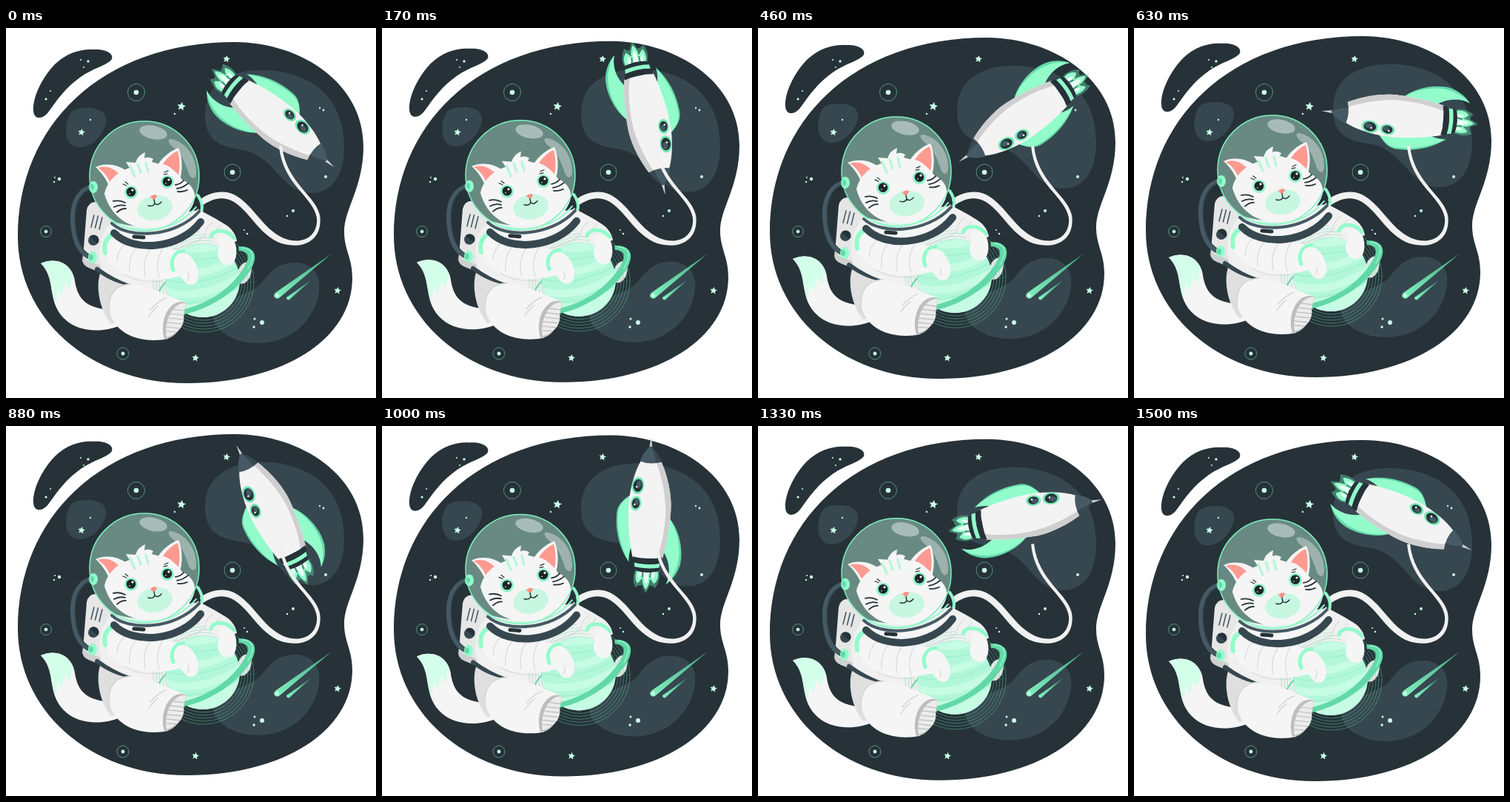
Recreate the animation shown at these times as an HTML page. Size 500 by 500 pixels, loop 1540 ms.

```html
<!DOCTYPE html>
<html lang="en">
<head>
<meta charset="utf-8">
<title>Space cat</title>
<style>
html, body { margin: 0; width: 100%; height: 100%; overflow: hidden; background: #fff; }
svg { display: block; width: 100vw; height: 100vh; }
.line { fill: none; stroke-linecap: round; stroke-linejoin: round; }
.night { fill: #263238; }
.cloud { fill: #37474f; }
.mint { fill: #92fccb; }
.deep { fill: #62d8a8; }
.white { fill: #f5f5f5; }
.ink { stroke: #263238; }
.fold { stroke: #d9dcdc; stroke-width: 1.3; }
</style>
</head>
<body>
<svg viewBox="0 0 500 500" xmlns="http://www.w3.org/2000/svg">
  <defs>
    <clipPath id="ball"><circle cx="266" cy="341" r="50"/></clipPath>
    <clipPath id="dome"><circle cx="187" cy="200" r="74"/></clipPath>
    <clipPath id="hull"><path d="M73 15C45 28 20 31 5 30C-20 29 -42 25 -58 21L-58 -19C-40 -24 -10 -28 15 -27C38 -26 60 -20 73 -13Z"/></clipPath>
    <linearGradient id="streak" x1="1" y1="0" x2="0" y2="1">
      <stop offset="0" stop-color="#43a883"/><stop offset="1" stop-color="#83f3c1"/>
    </linearGradient>
  </defs>

  <g class="bob">
    <path class="night" d="M310 19C400 20 483 75 483 160C483 215 457 245 457 275C457 300 468 310 468 338C468 420 375 480 245 480C110 480 16 390 16 282C16 133 127 19 310 19Z"/>
    <path class="night" d="M118 29C134 28 146 34 143 42C138 50 120 53 101 66C80 81 70 96 57 114C50 123 38 125 37 112C36 96 46 70 66 49C82 34 100 28 118 29Z"/>
    <path class="cloud" d="M340 57C400 55 457 85 457 160C457 200 440 223 413 223C370 223 365 170 315 164C285 160 269 148 269 118C269 72 308 58 340 57Z"/>
    <path class="cloud" d="M100 109C125 105 140 115 134 132C128 150 112 163 96 161C82 158 78 140 84 122C87 113 92 110 100 109Z"/>
    <path class="cloud" d="M392 317C415 318 426 335 423 355C418 395 385 426 340 426C305 426 275 405 281 385C290 365 330 362 345 345C358 328 370 316 392 317Z"/>
  </g>

  <g id="sky" fill="#c9ffe6"></g>
  <path fill="url(#streak)" d="M440 305L369 365Q364 367 362 362Q362 359 365 357Z"/>
  <path fill="url(#streak)" d="M412 341L383 367Q379 368 379 364Z"/>
  <circle cx="366.500" cy="361.500" r="2.500" fill="#c9ffe6"/>

  <g id="rocket">
    <path class="deep" d="M-74 17C-86 20 -94 15 -98 12C-94 9 -94 7 -95 5C-98 4 -102 2 -105 0C-101 -3 -97 -4 -94 -5C-95 -8 -94 -11 -98 -14C-90 -18 -82 -18 -74 -15Z" opacity=".45"/>
    <path class="mint" d="M-74 15C-84 18 -89 14 -92 11C-89 8 -87 7 -85 5C-91 5 -96 3 -100 0C-95 -4 -90 -5 -85 -5C-87 -7 -90 -9 -92 -12C-86 -15 -81 -15 -74 -13Z"/>
    <path fill="#e9fff5" d="M-74 11Q-83 12 -86 9Q-81 7 -78 3Q-88 4 -93 0Q-87 -4 -78 -3Q-81 -8 -86 -10Q-80 -12 -74 -9Z"/>
    <path class="line" stroke="#3f8f74" stroke-width="2" d="M-76 6L-83 5M-76 -5L-83 -5"/>
    <path class="night" d="M-69 18Q-73 0 -69 -16L-75 -14Q-79 0 -75 16Z"/>
    <path class="mint" d="M-64 18Q-68 0 -64 -17L-70 -16Q-73 0 -70 17Z"/>
    <path class="deep" d="M0 26C-15 42 -45 50 -66 45C-79 41 -87 34 -92 27C-80 33 -62 32 -48 22Z"/>
    <path class="mint" d="M0 26C-15 40 -45 47 -64 42C-77 39 -86 33 -92 27C-80 33 -62 32 -48 22Z"/>
    <path class="deep" d="M27 -25C18 -38 10 -43 0 -43C-22 -44 -45 -38 -64 -24C-54 -25 -45 -23 -38 -20Z"/>
    <path class="mint" d="M27 -25C18 -37 10 -41 0 -41C-20 -42 -43 -36 -62 -25C-54 -25 -45 -23 -38 -20Z"/>
    <g clip-path="url(#hull)">
      <path fill="#f3f3f3" d="M-60-35H80V35H-60Z"/>
      <path fill="#cfcfcf" d="M73 8C45 19 20 23 5 23C-20 23 -42 19 -58 13V35H80Z"/>
    </g>
    <path class="night" d="M-56 21Q-61 0 -56 -19L-64 -18Q-68 0 -64 19Z"/>
    <path fill="#cfd8dc" d="M92 2L107 0L92 -2Z"/>
    <path fill="#455a64" d="M73 15C82 11 90 5 94 0C90 -6 82 -11 73 -14Q68 0 73 15Z"/>
    <path class="cloud" d="M73 15C82 11 90 5 94 0C85 5 78 7 71 7Z"/>
    <g id="ports"></g>
  </g>

  <path fill="#f0f0f0" d="M262 232C275 222 293 218 308 225C334 238 346 271 375 284C400 294 422 282 420 257C416 228 374 212 369 160L373 159C378 210 422 228 424.500 256C427 287 402 300 372 291C341 280 328 244 304 233C290 227 277 232 265 240Z"/>

  <g class="bob">
    <!-- tail -->
    <path class="white" d="M47 318C70 308 90 320 93 342C97 366 108 381 150 381L154 402C132 412 96 412 77 391C55 367 68 339 47 318Z"/>
    <path fill="#d3ffea" d="M47 318C70 308 90 320 93 342L89 337L87 353L80 344L76 362L70 352L67 372C58 352 65 337 47 318Z"/>
    <!-- backpack -->
    <path fill="#e6e6e6" d="M120 235Q111 236 109 246L104 310Q103 320 112 324L142 336L160 250Z"/>
    <path fill="#cfcfcf" d="M104 306L103 314Q104 321 112 324L142 336L144 328L113 315Q105 313 104 306Z"/>
    <path class="line" stroke="#455a64" stroke-width="1.600" d="M119 253L115 269M124.500 254L120.500 270M130 256L126 272"/>
    <circle cx="118" cy="287" r="7" class="cloud"/><path class="night" d="M113 282A7 7 0 0 1 124 291Z"/>
    <path class="line" stroke="#455a64" stroke-width="6" d="M117 214C99 218 90 235 90 256C90 284 98 304 115 311"/>
    <path class="line" stroke="#37474f" stroke-width="1.500" d="M115 217C101 221 93 237 93 256C93 282 100 300 115 308"/>
    <ellipse cx="117" cy="310" rx="6" ry="8" class="mint"/><ellipse cx="115" cy="310" rx="3" ry="4" class="deep"/>

    <!-- body -->
    <path class="line" stroke="#92fccb" stroke-width="4" d="M259 226Q269 240 262 253"/>
    <path fill="#f0f0f0" d="M143 262C124 282 124 306 130 333L165 360L222 372L300 340L308 286C304 264 282 258 262 246Z"/>
    <path class="line fold" d="M205 303Q250 298 275 276M210 309Q238 308 258 296M160 333Q180 345 210 342"/>
    <path class="line" stroke="#37474f" stroke-width="6" d="M123 326Q145 342 166 349M200 361Q212 365 226 364"/>
    <ellipse cx="322" cy="331" rx="9" ry="15" transform="rotate(18 322 331)" fill="#e8e8e8"/>
    <path class="line fold" d="M314 340L330 328M315 346L329 337M318 332L331 320"/>

    <!-- planet -->
    <g class="line" stroke="#62d8a8" stroke-width=".8" opacity=".55" id="halo"></g>
    <path class="line" stroke="#62d8a8" stroke-width="2" d="M222 338C207 350 201 364 208 367"/>
    <circle cx="266" cy="341" r="50" fill="#b2f7d9"/>
    <g clip-path="url(#ball)">
      <path fill="#c6fbe4" d="M215 320Q260 338 315 303V315Q265 346 214 333ZM214 350Q258 366 316 330V342Q260 376 214 360ZM230 300Q265 310 305 294L295 285ZM214 372Q262 382 316 352V395H214Z"/>
      <path class="line" stroke="#9cefcb" stroke-width="1.200" d="M215 340Q260 353 316 322M219 370Q260 379 314 350M225 309Q265 321 312 300"/>
    </g>
    <path class="deep" d="M314 295C337 295 342 308 330 328C312 356 274 382 231 389L235 381C270 375 301 354 318 329C331 311 329 302 315 301Z"/>
    <path class="line" stroke="#8ff2c5" stroke-width="1.500" d="M319 297C336 298 336 309 327 326"/>

    <!-- leg -->
    <path fill="#dfdfdf" d="M127 332C121 351 127 382 142 400L170 395L180 350Q150 348 127 332Z"/>
    <path class="white" d="M141 386C137 358 152 344 175 347C197 350 215 360 243 371L219 420C190 426 151 419 141 386Z"/>
    <path class="line" stroke="#d7d7d7" stroke-width="1.500" d="M138 389C137 361 146 347 169 346M195 381Q204 370 216 365M193 390Q199 380 206 376"/>
    <path fill="#bdbdbd" d="M243 371C222 364 206 394 214 420C230 420 240 403 243 371Z"/>
    <path fill="#ececec" d="M243 372C227 370 213 394 217 418C236 412 242 399 240 388Z"/>
    <path class="line" stroke="#bcbcbc" stroke-width="1.200" d="M226 380L241 382M222 386L240 388M220 392L240 394M218 398L238 400M217 404L235 406M217 410L230 411"/>

    <!-- arms -->
    <path fill="#f0f0f0" d="M272 260C294 258 310 273 312 288L287 296Q277 282 262 276Z"/>
    <path class="line fold" d="M279 263Q270 269 269 278M289 267Q281 275 279 283"/>
    <path class="line" stroke="#92fccb" stroke-width="5" d="M277 282C280 272 298 271 308 284"/>
    <path class="white" d="M289 282C300 277 310 285 311 297C313 312 307 321 299 320C288 319 283 306 288 296Z"/>
    <path class="white" d="M142 280C158 274 169 286 183 291C203 296 220 296 233 302L238 334C210 345 167 341 147 324C130 309 130 289 142 280Z"/>
    <path class="line" stroke="#92fccb" stroke-width="6" d="M134 304C129 282 149 270 165 284"/>
    <path class="line fold" d="M166 289Q151 297 150 315M181 292Q165 305 167 330M198 296Q184 309 188 335M212 298Q201 314 207 337"/>
    <path class="line" stroke="#92fccb" stroke-width="5" d="M226 327C221 314 227 303 240 301"/>
    <path class="white" d="M232 306C243 300 252 309 257 320C263 332 260 347 250 347C242 347 239 339 234 333C227 326 225 311 232 306Z"/>
    <path class="line fold" d="M245 341Q249 337 246 331"/>

    <!-- collar -->
    <path class="white" d="M142 260C166 283 224 284 260 244L266 262C240 298 175 304 144 278Z"/>
    <path class="line" stroke="#455a64" stroke-width="4" d="M143 264C165 285 228 284 261 248"/>
    <path class="line" stroke="#37474f" stroke-width="10" stroke-linecap="butt" d="M146 277C172 304 235 299 263 262"/>
    <path class="line" stroke="#263238" stroke-width="5" d="M173 282L186 283"/>

    <!-- helmet -->
    <circle cx="187" cy="200" r="74" fill="#688a82"/>
    <g clip-path="url(#dome)">
      <path fill="#9db2ad" d="M222 150C240 152 258 172 257 196C256 206 250 204 247 197C242 182 238 172 228 163C220 157 217 151 222 150Z"/>
      <path fill="#e2f2ec" d="M133 255C156 272 224 277 253 239L260 260L210 285L150 280Z"/>
    </g>
    <ellipse cx="199" cy="141" rx="19" ry="9" transform="rotate(12 199 141)" fill="#a8bcb7"/>
    <ellipse cx="118" cy="215" rx="6" ry="8" class="mint"/><ellipse cx="116" cy="215" rx="3" ry="4" class="deep"/>

    <!-- head -->
    <path class="white" d="M139 213C134 202 128 194 121 188C134 182 151 184 164 194ZM205 185C212 174 222 166 233 162C239 176 239 194 234 208Z"/>
    <path fill="#ff9a91" d="M141 210C137 200 131 193 124 189C136 185 147 190 154 199ZM212 184C218 175 225 169 232 166C236 181 235 194 232 202C228 192 221 186 212 184Z"/>
    <path class="white" d="M133 224C137 206 151 194 167 189L162 181L175 182Q178 172 188 168L187 176Q192 173 199 177L197 181L208 184C222 186 231 195 238 205C252 211 258 224 254 235C247 257 222 270 194 270C164 271 141 253 133 224Z"/>
    <path class="line" stroke="#b9f6da" stroke-width="3.500" d="M168 187L174 201M178 184L182 195M189 182L192 194"/>
    <ellipse cx="201" cy="243" rx="24" ry="17" transform="rotate(-10 201 243)" fill="#c8f7e1"/>
    <g id="eyes"></g>
    <path fill="#ff8f86" d="M195 228Q199 224 204 226Q203 231 200 232Q197 231 195 228Z"/>
    <path class="line ink" stroke-width="1.500" d="M200 232L201 237Q199 242 192 240M201 237Q205 241 210 235"/>
    <path class="line ink" stroke-width="1.800" d="M145 234Q154 232 161 236M146 242Q153 238 161 240M150 249Q155 244 162 244M229 212Q236 211 240 206M231 217Q239 216 246 210M232 221Q239 222 245 219"/>
    <path class="line ink" stroke-width="1.200" d="M158 211L163 213M161 208L165 211M213 198L218 197M214 195L219 193"/>
    <circle cx="187" cy="200" r="74" fill="none" stroke="#7df0bd" stroke-width="1.500"/>
    <path class="line" stroke="#92fccb" stroke-width="2" d="M140 258C166 280 224 281 257 242"/>
  </g>
</svg>
<script>
const LOOP = 1540, STEPS = 37;
const $ = id => document.getElementById(id);
const add = (id, html) => $(id).insertAdjacentHTML('beforeend', html);
const dot = (x, y, r, extra = '') => `<circle cx="${x}" cy="${y}" r="${r}" ${extra}/>`;

function star(x, y, r) {
  const pts = Array.from({ length: 10 }, (_, i) => {
    const a = i * Math.PI / 5 - 1.4, d = i % 2 ? r * 0.48 : r;
    return `${x + d * Math.cos(a)},${y + d * Math.sin(a)}`;
  });
  return `<polygon points="${pts.join(' ')}"/>`;
}

const orbs = [[176, 87, 3.3, 11.5], [306, 195, 3.3, 11], [54, 275, 2.3, 7.5], [158, 440, 2.4, 8]];
const stars = [[298, 42, 5], [237, 106, 6], [102, 141, 5], [448, 355, 5], [256, 446, 5]];
const specks = [
  [228, 116, 1.2], [114, 124, 1.2], [72, 204, 2.2], [65, 208, 1.2], [66, 202, 1],
  [424, 108, 1.2], [429, 111, 1.4], [432, 201, 2], [388, 247, 2], [380, 254, 1.2],
  [322, 273, 1], [326, 278, 1.3], [336, 393, 1.5], [346, 398, 3], [335, 404, 1.7],
  [54, 96, 1.6], [60, 85, 1], [111, 45, 1.7], [101, 43, 1], [105, 53, 1]
];
for (const [x, y, r, ring] of orbs)
  add('sky', dot(x, y, r) + dot(x, y, ring, 'fill="none" stroke="#5d9c86" stroke-width=".9"'));
for (const s of stars) add('sky', star(...s));
for (const s of specks) add('sky', dot(...s));

for (let i = 0; i < 5; i++) add('halo', dot(267, 343, 52 + i * 4));

for (const [x, y, r] of [[40, -15.5, 11.5], [16, -17.5, 10]])
  add('ports', `<g transform="translate(${x} ${y}) rotate(6)">
    <ellipse rx="${r}" ry="${r * 0.72}" fill="#74e6b4"/>
    <ellipse rx="${r - 3}" ry="${r * 0.72 - 2}" fill="#263238"/>
    <ellipse cx="2" cy="1" rx="${r * 0.45}" ry="${r * 0.3}" fill="#455a64"/>
    <circle cx="-2" cy="-1.500" r="1.300" fill="#f5f5f5"/></g>`);

for (const [x, y] of [[169, 222], [218, 208]])
  add('eyes', dot(x, y, 9, 'fill="#8ff2c9"') + dot(x, y - 0.5, 6.3, 'fill="#1b2529"') +
    dot(x + 2, y - 3, 1.6, 'fill="#fff"') + dot(x - 2, y + 2, 0.8, 'fill="#fff"'));

// Rocket heading: [ms, degrees]
const turn = [[0, 38.7], [460, 146.5], [880, 244.3], [1130, 302.7], [1500, 386.3], [1540, 398.7]];
function heading(t) {
  const i = turn.findIndex(k => k[0] > t);
  const [t0, a0] = turn[i - 1], [t1, a1] = turn[i];
  return a0 + (a1 - a0) * (t - t0) / (t1 - t0);
}

const floaters = document.querySelectorAll('.bob');
function draw(now) {
  const step = Math.floor((now % LOOP) / LOOP * STEPS + 0.08) % STEPS;
  const t = step * LOOP / STEPS;
  const lift = -4.3 * (1 - Math.cos(2 * Math.PI * (t + 20) / LOOP));
  for (const g of floaters) g.setAttribute('transform', `translate(0 ${lift.toFixed(2)})`);
  $('rocket').setAttribute('transform', `translate(360 121) rotate(${heading(t).toFixed(2)})`);
}

const start = performance.now();
function tick() {
  draw(performance.now() - start);
  requestAnimationFrame(tick);
}
tick();
</script>
</body>
</html>
```
